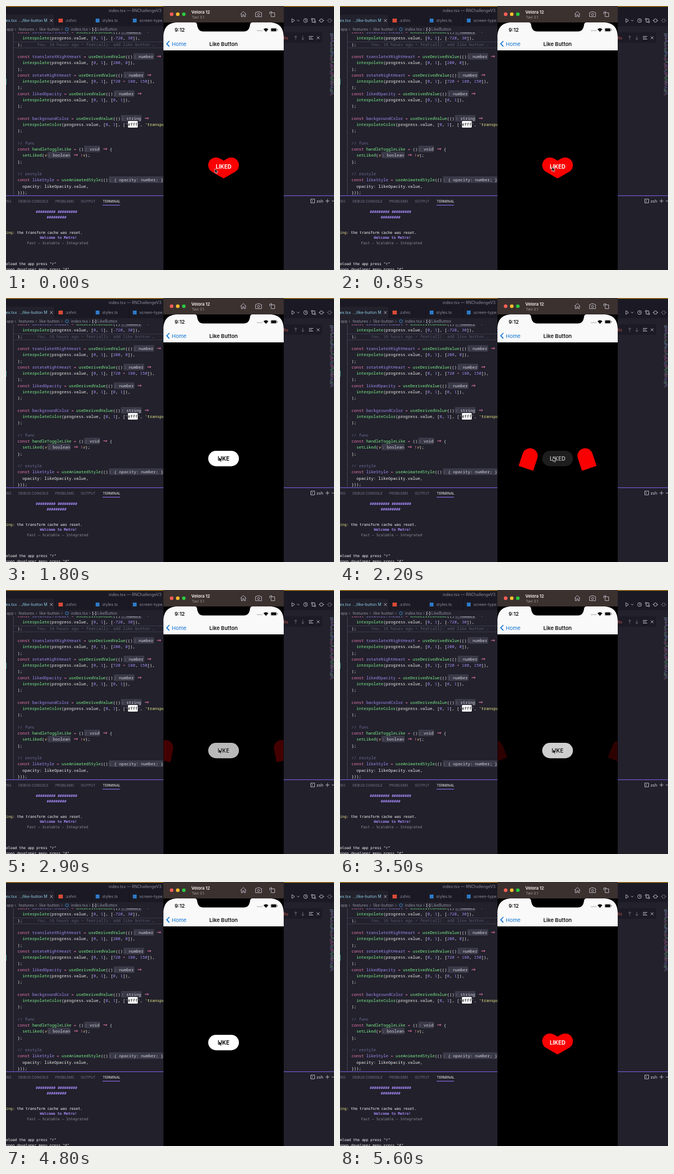
Animation of 600 by 482 pixels, one loop 5.65 s. Source, as an HTML page:

```html
<!DOCTYPE html>
<html lang="en">
<head>
<meta charset="utf-8">
<title>Like button</title>
<style>
  html, body { margin: 0; width: 600px; height: 482px; overflow: hidden; background: #22212c; }
  svg { position: absolute; left: 0; top: 0; font-family: Inter, "Noto Sans", sans-serif; }
  text { white-space: pre; }
  #code {
    position: absolute; left: 0; top: 48px; width: 288px; height: 297px; overflow: hidden;
    font: 7.48px/11.27px "Noto Sans Mono", "DejaVu Sans Mono", monospace; color: #f0f0ec;
  }
  #code div { position: absolute; left: 21px; white-space: pre; height: 11.27px; }
  .key, .arrow { color: #f57ab5; }
  .arrow { font: 9.5px/0 "DejaVu Sans", sans-serif; }
  .fn { color: #7df08a; }
  .num, .name { color: #a58cf5; }
  .str { color: #f0f08a; }
  .arg { color: #ffca80; font-style: italic; }
  .note { color: #6f6d99; }
  .blame { color: #5b5a72; }
  .chip { background: #3a3948; color: #d6d6de; border-radius: 2px; padding: 1px; margin: 0 1px; }
  .swatch { background: #fff; color: #111; border-radius: 1.5px; padding: 1px 0; }
  .term { font: 6.63px "DejaVu Sans Mono", monospace; fill: #fff; }
  .bold { font-weight: 700; fill: #a98bfa; }
  .ui { font-size: 6.4px; fill: #77768a; }
  .file { font-size: 7.3px; fill: #8e8d9e; }
  .open { fill: #8fd0e8; }
  .icon { fill: none; stroke: #b5b4c0; stroke-width: 1; }
  .like { font-size: 9.9px; font-weight: 700; text-anchor: middle; }
</style>
</head>
<body>
<svg width="600" height="482">
  <rect width="600" height="482" fill="#22212c"/>
  <rect width="600" height="37" fill="#1b1a24"/>
  <rect y="16" width="89" height="21" fill="#22212c"/>
  <rect width="600" height="1.2" fill="#c58a16"/>
  <g class="file">
    <text x="188" y="10.6">index.tsx — RNChallengeV3</text>
    <text class="open" x="-11" y="29">index.tsx</text>
    <text class="open" x="23" y="29" font-size="7">.../like-button M</text>
    <text x="108" y="29">.zshrc</text>
    <text x="176" y="29">styles.ts</text>
    <text x="244" y="29">screen-type</text>
  </g>
  <path class="icon" d="M80.5 24l5 5m0-5l-5 5"/>
  <rect x="96" y="23" width="8" height="7" fill="#d94a35"/>
  <rect x="164" y="23" width="7" height="7" fill="#2d79c7"/>
  <rect x="232" y="23" width="7" height="7" fill="#2d79c7"/>
  <path d="M89.5 16v21M157.5 16v21M225.5 16v21" stroke="#15141c"/>

  <g class="file">
    <text x="1" y="45">app</text><text x="16" y="45">›</text>
    <text x="23" y="45">features</text><text x="54" y="45">›</text>
    <text x="61" y="45">like-button</text><text x="101" y="45">›</text>
    <text x="119" y="45">index.tsx</text><text x="152" y="45">›</text>
    <text x="167" y="45">LikeButton</text>
  </g>
  <circle cx="111.5" cy="42.5" r="2.8" class="icon" style="stroke:#3e8fd0"/>
  <path class="icon" d="M160 40h-1.5v5.5h1.500M163 40h1.500v5.500h-1.500M160.500 42.800h2"/>

  <path d="M13 65.5H288M13 76.5H288" stroke="#3a394b"/>
  <path d="M13.5 48V345" stroke="#454457"/>
  <path d="M0 133v11" stroke="#3d9a8b" stroke-width="2"/>

  <g class="icon">
    <path d="M523 23v7l5-3.5zM532.5 25.5l2 2 2-2"/>
    <circle cx="548" cy="26.5" r="3.5"/><path d="M548 24.5v2.2h2"/>
    <circle cx="560" cy="24" r="1.5"/><circle cx="565" cy="29" r="1.5"/><path d="M560 25.5v4h3.500M565 27.500v-4h-3"/>
    <circle cx="577" cy="26.5" r="3"/><path d="M572 26.5h2m6 0h2"/>
    <g opacity=".5"><circle cx="592" cy="26.5" r="3"/><path d="M587 26.5h2m6 0h2"/></g>
  </g>
  <rect x="508" y="48" width="70" height="19" fill="#1c1b25"/>
  <text x="508" y="60.5" font-size="7.3" fill="#d0584f">lts</text>
  <path class="icon" opacity=".5" d="M530 61.5v-7m-2.500 2.500l2.500-2.500 2.500 2.500M543 54.500v7m-2.500-2.500l2.500 2.500 2.500-2.500"/>
  <path class="icon" d="M554 55.5h8M554 58h6M554 60.500h8M568.500 55.500l5 5m0-5l-5 5"/>
  <g id="map"></g>

  <rect y="345" width="600" height="137" fill="#21202b"/>
  <rect y="345.8" width="600" height="1.2" fill="#7a5bd2"/>
  <g class="ui">
    <text x="-3" y="359">ENS</text><text x="23" y="359">DEBUG CONSOLE</text>
    <text x="90" y="359">PROBLEMS</text><text x="137" y="359">OUTPUT</text>
    <text x="177" y="359" fill="#f0f0f0">TERMINAL</text>
    <text x="568" y="358.5" font-size="7.3" fill="#dcdce2">zsh</text>
  </g>
  <rect x="176.5" y="363" width="32" height="1.2" fill="#8b6be0"/>
  <path class="icon" d="M557.5 352.5h7v7h-7zM559.500 354.500l1.500 1.500-1.500 1.500M584.500 356h7M588 352.500v7M596 355l2 2 2-2"/>
  <g class="term">
    <text class="bold" x="54.5" y="378.3">######### #########</text>
    <text class="bold" x="74.5" y="387.6">#########</text>
    <text x="0" y="415.6"><tspan fill="#efe58b">ing:</tspan> the transform cache was reset.</text>
    <text class="bold" x="62" y="425.1">Welcome to Metro!</text>
    <text x="38.5" y="434.6" fill="#8f8e99">Fast — Scalable — Integrated</text>
    <text x="0" y="473.3">eload the app press "r"</text>
    <text x="0" y="482.6">open developer menu press "d"</text>
  </g>
</svg>

<div id="code"></div>

<svg width="600" height="482">
  <defs>
    <clipPath id="screen"><rect x="288.5" y="30" width="219" height="452"/></clipPath>
    <path id="half" d="M-5 -14.05H19V14.05H-5A14.05 14.05 0 0 1 -5 -14.05Z" fill="#fb0000"/>
  </defs>
  <rect x="288" width="220" height="482" fill="#000"/>
  <rect x="288" width="220" height="30" fill="#3b312f"/>
  <circle cx="303" cy="15" r="3.3" fill="#fb5f57"/>
  <circle cx="314.2" cy="15" r="3.3" fill="#fcbc2f"/>
  <circle cx="325.3" cy="15" r="3.3" fill="#2bc840"/>
  <text x="339" y="13.8" font-size="7.7" font-weight="700" fill="#e6e1df">Velora 12</text>
  <text x="340" y="22.8" font-size="6.5" fill="#a69d9a">Tavi 3.1</text>
  <g class="icon">
    <path d="M429 15l5.2-5 5.2 5M430.5 14v5.500h2.500v-3.500h2.500v3.500h2.500V14"/>
    <path d="M456.5 12h2l1-1.500h5l1 1.500h2v7.500h-11z"/><circle cx="462" cy="15.5" r="2"/>
    <path d="M485 12.5h6.500v7H485zM482.500 15v-4h4m-1.500-1.500l1.500 1.500-1.500 1.500"/>
  </g>

  <path d="M288 81V57C288 39 297 30 314 30H345Q349 30 349.5 34C350.5 42 354 46.5 361 46.5H435C442 46.5 445.5 42 446.5 34Q447 30 451 30H482C499 30 508 39 508 57V81Z" fill="#f9f9f9"/>
  <text x="308.5" y="47" font-size="9.3" font-weight="600" fill="#111">9:12</text>
  <g fill="#777">
    <circle cx="460" cy="45" r=".8"/><circle cx="462.7" cy="45" r=".8"/>
    <circle cx="465.4" cy="45" r=".8"/><circle cx="468" cy="45" r=".8"/>
  </g>
  <g fill="#111">
    <path d="M471 42.5Q475.5 38.5 480 42.5L475.5 47.3Z"/>
    <rect x="485" y="41" width="9.5" height="5" rx="1.2"/>
    <rect x="496.3" y="42.5" width=".8" height="2"/>
  </g>
  <rect x="484.2" y="40.2" width="11.1" height="6.6" rx="1.9" fill="none" stroke="#888" stroke-width=".6"/>
  <path d="M298.8 64l-4.8 4.900 4.800 4.900" fill="none" stroke="#1173d4" stroke-width="1.7"/>
  <text x="303.3" y="72.5" font-size="9.6" fill="#1173d4">Home</text>
  <text x="398" y="72.5" font-size="9.6" font-weight="600" fill="#111" text-anchor="middle">Like Button</text>

  <g clip-path="url(#screen)">
    <rect id="pill" x="369.9" y="279" width="56.2" height="28.2" rx="14.1"/>
    <use id="left" href="#half"/>
    <use id="right" href="#half"/>
    <text id="like" class="like" x="398" y="296.7" fill="#0c0c0c">LIKE</text>
    <text id="liked" class="like" x="398" y="296.7" fill="#fff">LIKED</text>
  </g>
  <path id="cursor" d="M0 0V8L1.900 6.300 3.200 9.300 4.700 8.600 3.400 5.800H6Z" fill="#0a0a0a" stroke="#eee" stroke-width=".7"/>
</svg>

<script>
  const $ = id => document.getElementById(id);

  // Type hints are written between « and ».
  const value = (name, type) => `const ${name} = useDerivedValue(()«: ${type}» ⇒`;
  const ramp = range => `  interpolate(progress.value, [0, 1], [${range}]),`;
  const lines = [
    value("rotateLeftHeart", "number"), ramp("-720, 30"), ");", "",
    value("translateXRightHeart", "number"), ramp("200, 0"), ");",
    value("rotateRightHeart", "number"), ramp("720 + 180, 150"), ");",
    value("likedOpacity", "number"), ramp("0, 1"), ");", "",
    value("backgroundColor", "string"),
    "  interpolateColor(progress.value, [0, 1], ['#fff', 'transparent']),", ");", "",
    "// func", "const handleToggleLike = ()«: void» ⇒ {",
    "  setLiked(v«: boolean» ⇒ !v);", "};", "",
    "// restyle", "const likeStyle = useAnimatedStyle(()«: { opacity: number; }» ⇒ ({",
    "  opacity: likeOpacity.value,", "}));"
  ];
  const token = /«(?<chip>.*?)»|(?<note>\/\/.*)|(?<swatch>#fff)|(?<str>'[a-z]+')|(?<arrow>⇒)|(?<key>const|[=!+]|-(?=\d))|(?<num>\b\d+)|(?<fn>handle\w+|\w+(?=\())|(?<arg>\bv\b)|(?<name>(?<=const )\w+)/g;
  const paint = text => text.replace(token, (...m) => {
    const [cls, word] = Object.entries(m.at(-1)).find(([, w]) => w !== undefined);
    return `<span class="${cls}">${word}</span>`;
  });
  $("code").innerHTML = lines.map((text, i) =>
    `<div style="top:${(i * 11.27 - 6).toFixed(2)}px">${paint(text)}</div>`).join("") +
    `<div class="blame" style="left:57px;top:16.5px">You, 16 hours ago • feat(all): add like button …</div>`;

  // Minimap
  let seed = 7;
  const rand = () => (seed = seed * 16807 % 2147483647) / 2147483647;
  const tints = ["#8a4a72", "#4b8a62", "#6a5aa8", "#6f6e80"];
  let specks = "";
  for (let y = 50; y < 162; y += 1.6) {
    const x = 592 + rand() * 3;
    specks += `<rect x="${x}" y="${y}" width="${2 + rand() * 5}" height=".8" fill="${tints[rand() * 4 | 0]}"/>`;
  }
  $("map").innerHTML = specks;

  const LOOP = 5650, STEP = 50, TURN = 300;
  const taps = [1014, 2030, 2678, 3436, 3920, 4950];
  const clamp = x => Math.max(0, Math.min(1, x));
  const ease = x => x < .5 ? 2 * x * x : 1 - 2 * (1 - x) ** 2;
  const mix = (a, b, k) => a + (b - a) * k;

  // Taps alternate between unliking and liking.
  const progress = t => taps.reduce((p, start, i) =>
    p + (i % 2 ? 1 : -1) * ease(clamp((t - start) / TURN)), 1);

  function draw(t) {
    const p = clamp(progress(t));
    const shade = Math.round(255 * (1 - p) ** 1.2);
    $("pill").setAttribute("fill", `rgba(${shade},${shade},${shade},${1 - p})`);
    const shift = 112.6 * (1 - p) + 9.7;
    $("left").setAttribute("transform", `translate(${398 - shift} 293) rotate(${mix(-720, 30, p)})`);
    $("right").setAttribute("transform", `translate(${398 + shift} 293) rotate(${mix(900, 150, p)})`);
    for (const id of ["left", "right"]) $(id).setAttribute("opacity", clamp(2 * p));
    $("like").setAttribute("opacity", 1 - p);
    $("liked").setAttribute("opacity", p);

    const a = ease(clamp((t - 50) / 600)), b = ease(clamp((t - 1300) / 500));
    $("cursor").setAttribute("transform", `translate(${382 + 5.7 * a + 1.8 * b} ${297 - 3.2 * a - 3.3 * b})`);
    $("cursor").setAttribute("visibility", t < 5300 ? "visible" : "hidden");
  }

  const begin = performance.now();
  function tick() {
    const t = (performance.now() - begin) % LOOP;
    draw(Math.floor(t / STEP) * STEP);
    requestAnimationFrame(tick);
  }
  tick();
</script>
</body>
</html>
```
